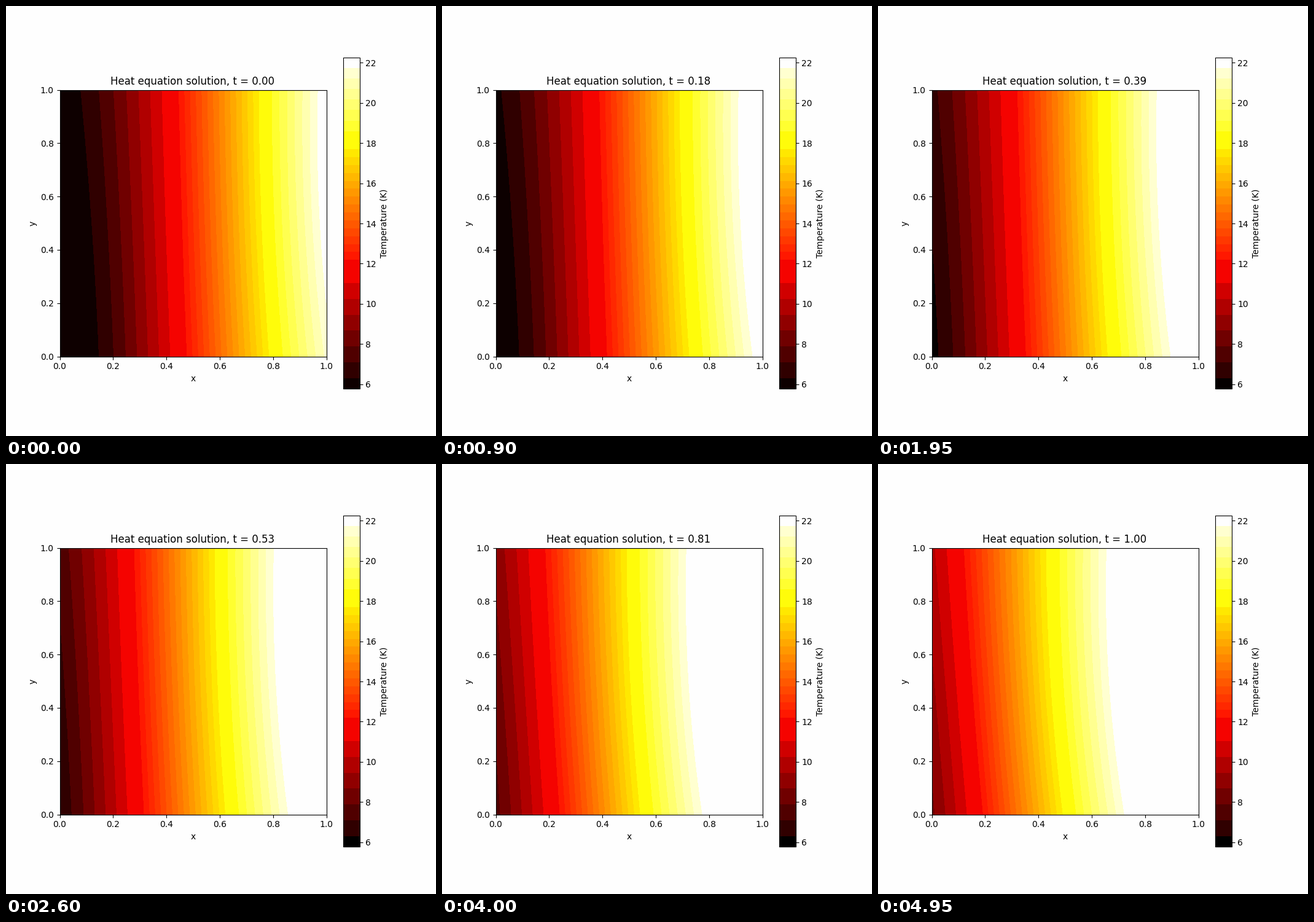
Recreate the animation shown at these times as a matplotlib script. Size 700 by 700 pixels, loop 5 s.

```python
import matplotlib.pyplot as plt
import numpy as np
from matplotlib.animation import FuncAnimation
from matplotlib.cm import ScalarMappable
from matplotlib.collections import PolyCollection
from matplotlib.colors import BoundaryNorm, ListedColormap

FRAMES, INTERVAL = 100, 50
T_MIN, T_MAX = 5.776, 22.256
PAPER = (254 / 255,) * 3

# Colour steps of the "hot" map: red and blue in 32s, green in 16s.
RED_END, GREEN_END = 0.365079, 0.746032
EDGES = np.concatenate([
    (np.arange(32, 225, 32) - 10.6) / 244.4 * RED_END,
    RED_END + np.arange(16, 241, 16) / 255 * (GREEN_END - RED_END),
    GREEN_END + np.arange(32, 225, 32) / 255 * (1 - GREEN_END),
])
BOUNDS = np.concatenate([[0], EDGES, [1]])
Y = np.linspace(0, 1, 60)


def top_x(u, t):
    """Isotherm u on the upper side: nearly linear, drifting left."""
    start = 0.097 + 0.9 * u - 0.08 * np.exp(-u / 0.06)
    return start - 0.315 * t - 0.022 * t**3 * (0.85 - u)


def lean(u, t):
    """How much further right isotherm u meets the lower side."""
    start = 0.03 + 0.04 * np.exp(-u / 0.1) + 0.075 * (u - 0.39)**2
    return start + t**2 * (0.06 - 0.05 * u) - 0.02 * t * (1 - t)


def isotherms(t):
    """x of every colour edge (rows) at each height (columns)."""
    u, depth = EDGES[:, None], 1 - Y
    mid = 0.62 - 0.5 * u
    bend = (4 * mid - 1) * depth + (2 - 4 * mid) * depth**2
    return np.clip(top_x(u, t) + lean(u, t) * bend, 0, 1)


def band_colors():
    hot = plt.get_cmap("hot", 2048)
    colors = [hot(np.linspace(a, b, 40))[:, :3].mean(axis=0)
              for a, b in zip(BOUNDS[:-1], BOUNDS[1:])]
    colors[-1] = PAPER
    return np.array(colors)


COLORS = band_colors()

fig, ax = plt.subplots(figsize=(7, 7), dpi=100, facecolor=PAPER)
ax.set(xlim=(0, 1), ylim=(0, 1), aspect="equal", xlabel="x", ylabel="y",
       facecolor=PAPER)
title = ax.set_title("", x=0.498)

norm = BoundaryNorm(T_MIN + (T_MAX - T_MIN) * BOUNDS, len(COLORS))
bar = fig.colorbar(ScalarMappable(norm, ListedColormap(COLORS)), ax=ax,
                   spacing="proportional", ticks=range(6, 23, 2),
                   format="%d", label="Temperature (K)")
bar.minorticks_off()

bands = PolyCollection([], edgecolors="none", antialiaseds=False)
ax.add_collection(bands, autolim=False)


def draw(n):
    t = n / (FRAMES - 1)
    lines = isotherms(t)
    # Each band reaches the right edge and is covered by the next one.
    lefts = np.vstack([np.zeros_like(Y), lines])
    bands.set_verts([np.vstack([np.column_stack([x, Y]), [(1, 1), (1, 0)]])
                     for x in lefts])

    # The coldest shade sinks to black as its area vanishes.
    cold = lines[0].mean()
    colors = COLORS.copy()
    colors[0] = (16 / 255 * cold / (cold + 0.014), 0, 0)
    bands.set_facecolor(colors)
    bar.solids.set_cmap(ListedColormap(colors))

    title.set_text(f"Heat equation solution, t = {t:.2f}")
    return bands, title


anim = FuncAnimation(fig, draw, frames=FRAMES, interval=INTERVAL,
                     repeat=True, repeat_delay=0)
plt.show()
```
